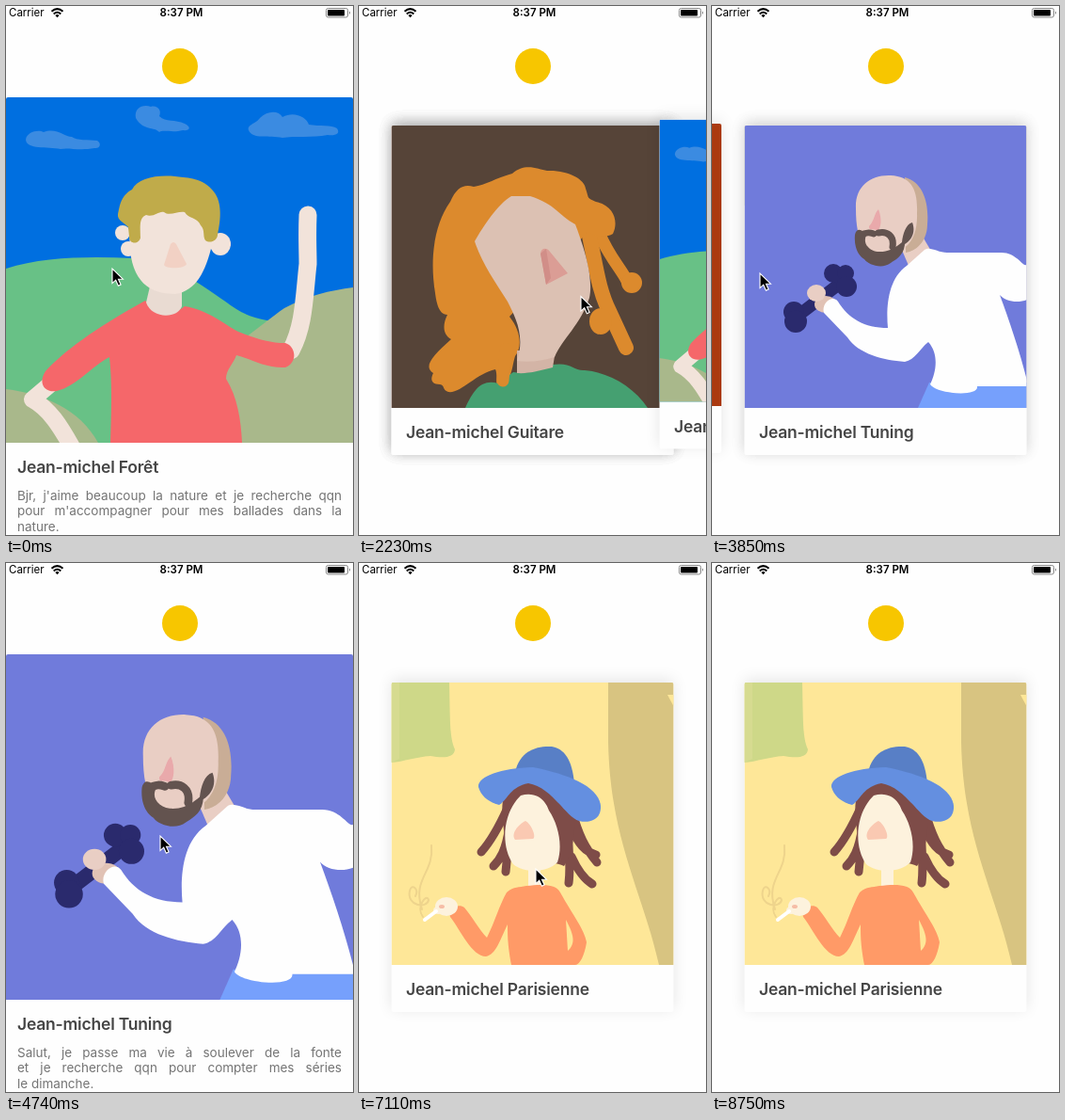
Recreate the animation shown at these times as an HTML page. Size 369 by 562 pixels, loop 9.2 s.

```html
<!DOCTYPE html>
<html lang="fr">
<head>
<meta charset="utf-8">
<title>Cards</title>
<style>
html, body { margin: 0; width: 100%; height: 100%; overflow: hidden; background: #fefefe; }
#stage { position: relative; width: 369px; height: 562px; overflow: hidden; font-family: Inter, "Liberation Sans", sans-serif; }
#bar, #cursor { position: absolute; left: 0; top: 0; overflow: visible; }
.card { position: absolute; left: 0; top: 0; background: #fefefe; border-radius: 2px; overflow: hidden; }
.card svg { display: block; width: 100%; }
.card h1 { position: absolute; margin: 0; font-size: 17.5px; font-weight: 600; line-height: 22px; letter-spacing: -.2px; color: #454545; white-space: nowrap; }
.card div { position: absolute; left: 12px; width: 345px; font-size: 13.5px; line-height: 16.7px; color: #747474; }
.card p { margin: 0; white-space: nowrap; text-align-last: justify; }
.card p:last-child { text-align-last: left; }
.line { fill: none; stroke-linecap: round; stroke-linejoin: round; }
</style>
</head>
<body>
<div id="stage">
  <svg id="bar" width="369" height="97">
    <g font-size="11.5">
      <text x="3" y="11">Carrier</text>
      <text x="186.5" y="11" text-anchor="middle" font-weight="600">8:37 PM</text>
    </g>
    <g class="line" stroke="#000" stroke-width="2" style="stroke-linecap:butt">
      <path d="M48.5 5.8Q54.5 .4 60.5 5.8M50.7 8.4Q54.5 5 58.3 8.4"/>
    </g>
    <path d="M52.4 9.9Q54.5 8.2 56.6 9.9L54.5 12.2Z"/>
    <rect x="340.5" y="2.5" width="23" height="9.5" rx="2" fill="none" stroke="#888"/>
    <rect x="342" y="4" width="18" height="6.5" rx=".8"/>
    <path d="M365 5.5Q367 7.2 365 9Z" fill="#777"/>
    <circle cx="185" cy="64" r="19" fill="#f7c600"/>
  </svg>
  <svg id="cursor" width="14" height="20">
    <path d="M0 0V15.6L3.7 12.2L6.4 18.2L9.1 17L6.5 11.2H11.4Z" stroke="#fff" stroke-width="1.1"/>
  </svg>
</div>
<script>
const CLOSED_BOX = '34.5 127 300 300';
const fill = (color, d) => `<path fill="${color}" d="${d}"/>`;
const line = (color, width, d) => `<path class="line" stroke="${color}" stroke-width="${width}" d="${d}"/>`;
const oval = (color, x, y, rx, ry = rx) => `<ellipse fill="${color}" cx="${x}" cy="${y}" rx="${rx}" ry="${ry}"/>`;

const forest = () => {
  const skin = '#f2e3da', sage = '#a9b88b', cloud = '#3b8be1';
  return fill('#006fe0', 'M0 97H369V464H0Z')
    + fill(cloud, 'M21 142C22 134 34 131 40 134C54 129 62 139 70 139C75 143 88 142 97 143C102 146 100 152 94 151C78 154 66 150 58 152C44 149 22 153 21 142Z')
    + fill(cloud, 'M138 119C136 108 146 104 154 107C161 105 166 111 163 117C170 124 180 120 190 125C198 129 195 133 188 132C177 135 167 131 163 134C158 128 146 133 138 119Z')
    + fill(cloud, 'M258 132C256 126 266 125 270 119C278 111 290 111 294 118C306 111 320 118 322 126C334 128 346 126 352 130C356 136 350 138 342 137C326 140 306 138 294 140C280 137 262 142 258 132Z')
    + fill('#68c186', 'M0 279C40 266 90 266 135 268C180 272 215 302 245 322C262 333 280 334 300 338V464H0Z')
    + fill(sage, 'M215 464L240 362C262 348 280 332 296 321C320 308 345 302 369 299V464Z')
    + fill(sage, 'M0 407C40 412 78 428 98 464H0Z')
    + line(skin, 19, 'M321 222C320 245 321 260 321 274C317 310 317 340 303 366')
    + line(skin, 18, 'M54 396L28 418C46 428 57 445 72 472')
    + fill('#f5676a', 'M148 313C160 326 180 328 190 319C215 323 232 338 247 346C265 353 280 358 297 358C309 362 310 379 297 384C275 385 258 374 245 371C242 380 234 386 234 396C246 415 250 440 251 464H111C112 430 113 400 110 373C92 382 75 404 54 409C40 411 34 400 42 388C60 368 95 342 148 313Z')
    + fill('#e9dbd2', 'M153 298L149 315C155 333 183 332 187 319V298Z')
    + oval(skin, 124, 241, 8) + oval(skin, 130, 258, 8) + oval(skin, 228, 253, 11, 12)
    + fill(skin, 'M132 235C128 288 148 306 180 306C206 302 215 275 222 240V212H140Z')
    + fill('#c0ab4a', 'M131 245C131 254 142 253 143 246C143 235 141 225 149 222C157 225 163 217 168 219C174 224 184 217 190 219C194 226 203 224 207 233C212 238 209 245 212 249C217 253 225 249 225 243C229 225 230 206 219 195C207 181 190 183 180 181C160 179 140 183 134 195C121 202 121 214 119 221C118 228 126 230 130 235Z')
    + fill('#f2d1c4', 'M175 253Q178 249 181 253L192 274C191 279 170 280 168 275Z');
};

const guitar = () => {
  const hair = '#dc8a2d';
  return fill('#564438', 'M34 127H335V427H34Z')
    + line(hair, 13, 'M255 240C264 264 278 278 285 292') + oval(hair, 290, 294, 11)
    + line(hair, 16, 'M243 235C252 275 254 300 266 324L284 363') + oval(hair, 257, 335, 12, 14)
    + fill(hair, 'M163 178C176 166 190 173 200 175C222 174 240 184 241 194C245 206 242 203 252 208C272 212 276 230 270 242C262 247 250 244 243 240L160 330C172 345 174 362 166 372C162 385 164 395 149 408C144 404 148 392 145 386C125 390 108 412 95 410C88 408 92 403 86 402C76 402 76 396 79 390C68 383 78 372 98 354C90 350 88 340 94 328C84 328 82 312 81 305C75 268 80 232 97 208C104 192 112 189 122 192C135 190 145 183 163 178Z')
    + fill('#45a071', 'M113 427C122 408 130 396 148 401L164 389C180 392 195 386 206 381C226 378 228 388 240 387C265 389 292 404 307 427Z')
    + fill('#d3b4a6', 'M168 366H209L206 384C194 387 180 391 168 390Z')
    + fill('#dcc1b3', 'M162 202H182C208 210 212 222 230 232C242 263 249 292 245 310C236 338 216 354 208 373C195 377 180 379 168 377C177 350 166 330 158 314C144 292 130 272 123 250C132 234 148 210 162 202Z')
    + line(hair, 13, 'M156 364L153 398')
    + fill('#db9d95', 'M193 263C194 256 200 257 203 261L222 284L199 296Z')
    + fill('#d18e88', 'M193 263L199 258L204 289L199 296Z');
};

const cook = () => fill('#ab3a10', 'M34 127H335V427H34Z')
  + fill('#f0d8a8', 'M105 427C108 365 145 345 185 345C225 345 260 365 265 427Z')
  + oval('#e6c4b0', 185, 270, 46, 62)
  + fill('#4a2c24', 'M136 262C136 190 234 190 234 262C215 230 155 230 136 262Z');

const tuning = () => {
  const skin = '#e9cec4', beard = '#63534f', steel = '#2a2a6d', bg = '#707bdb';
  return fill(bg, 'M34 127H335V427H34Z')
    + fill('#76a0fc', 'M231 400L219 427H335V400Z')
    + fill(skin, 'M198 250L224 245L234 262L210 278Z')
    + fill('#c9ad96', 'M205 182C224 187 231 208 229 232C229 248 219 260 206 262Z')
    + fill(skin, 'M153 215C152 192 168 179 190 180C212 181 219 195 218 220C219 246 208 264 180 264C158 262 153 242 153 215Z')
    + fill('#e9a9ab', 'M177 216C181 226 180 236 176 239C171 235 167 240 167 234C173 228 172 221 177 216Z')
    + fill(beard, 'M152 243C154 234 161 238 164 244C160 252 167 260 176 261C188 262 196 256 202 251C203 242 206 232 213 230C217 240 212 249 205 253C204 266 194 270 190 273C181 280 166 275 162 269C154 264 151 254 152 243Z')
    + line(beard, 7, 'M157 244C165 239 169 241 172 242M177 241C186 239 194 244 192 256')
    + line(steel, 13, 'M90 330L137 294')
    + oval(steel, 87, 325, 11) + oval(steel, 89, 335, 12) + oval(steel, 129, 284, 10) + oval(steel, 142, 284, 9) + oval(steel, 143, 298, 11)
    + oval('#e1c2b5', 121, 317, 12, 9) + oval(skin, 111, 305, 10, 9)
    + fill('#fefefe', 'M226 259C232 255 240 262 250 262L308 262C325 262 332 280 335 274V404H282C284 416 238 412 232 402C238 390 242 370 230 357C220 365 216 376 205 378C182 376 156 370 144 352L119 326C116 316 128 306 134 314C145 332 162 342 187 342C185 320 187 290 207 276Z')
    + fill(bg, 'M306 307C312 314 325 316 335 312V398C327 366 316 334 306 307Z');
};

const paris = () => {
  const hair = '#7e4c48', pale = '#fdf2dd', wall = '#fee798';
  return fill(wall, 'M34 127H335V427H34Z')
    + fill('#ced888', 'M34 127H96C97 165 96 185 102 198C101 208 88 207 76 205C60 206 48 211 34 212Z')
    + fill('#d6db90', 'M34 127H43V208L34 212Z')
    + fill('#d8c481', 'M265 127H335V427H319C302 350 267 295 265 190Z')
    + fill(wall, 'M328 140H335V153Z')
    + line('#eed48c', 2, 'M68 376C60 366 72 350 74 358C72 368 50 364 54 348C56 340 64 346 60 354M67 368C56 335 80 330 77 300')
    + line(hair, 9, 'M158 260C148 282 140 296 130 307M160 280C156 306 150 315 143 322M158 308L156 328M223 268C221 300 226 318 223 340M226 262C234 290 240 302 253 318M228 284Q235 305 252 310M226 312Q236 334 248 341')
    + fill(hair, 'M153 275C150 245 156 232 180 232C206 230 226 246 229 272C230 285 227 310 218 322C205 315 160 315 156 302Z')
    + fill(pale, 'M180 316H193V343H180Z')
    + fill(pale, 'M172 247C186 243 197 249 202 263C212 278 217 300 211 318C200 329 176 330 164 320C150 300 153 265 172 247Z')
    + fill('#fac9b2', 'M177 274C183 277 189 291 185 293L166 294C161 288 169 278 177 274Z')
    + fill('#587fc6', 'M166 222C171 200 188 194 205 195C222 198 227 215 229 234L190 230Z')
    + fill('#648fe0', 'M127 238C126 227 150 218 185 217C215 223 255 235 257 258C258 272 246 277 234 274C220 270 205 238 180 234C160 238 158 252 149 257C138 254 130 248 127 238Z')
    + fill('#ff9a67', 'M178 343C195 341 210 341 214 350C228 375 240 390 242 403C240 416 235 427 230 427H162C158 405 158 395 158 384C150 400 146 416 135 418C120 418 108 390 97 376C94 367 106 361 112 366C120 375 128 390 136 398C145 380 149 364 157 350C165 343 170 345 178 343Z')
    + fill(wall, 'M220 379C228 394 231 404 222 412Z')
    + oval(pale, 93, 365, 12, 10) + oval(pale, 84, 369, 5, 4) + oval('#f6bda6', 88, 365, 3, 2)
    + line('#fff', 4, 'M70 379L82 370');
};

const REST = [[0, 0, 0]];
const cards = [
  { name: 'Parisienne', art: paris(), move: [[43, 0, 0], [46, 34, -30], [48, 0, 0]] },
  { name: 'Tuning', art: tuning(), move: [[37, 0, 0], [38, 90, -5], [39, 270, -12], [40, 420, -15]],
    open: [[25, 0], [26, .6], [27, 1], [34, 1], [37, 0]],
    about: ["Salut, je passe ma vie à soulever de la fonte", "et je recherche qqn pour compter mes séries", "le dimanche."] },
  { name: 'Cuisine', art: cook(), move: [[19, 0, 0], [20, -90, -5], [21, -324.5, -2], [22, -400, 0]] },
  { name: 'Guitare', art: guitar(), move: [[16, 0, 0], [17, -116, -8], [18, -400, -15]] },
  { name: 'Forêt', art: forest(), box: '0 97 369 367', move: [[7, 0, 0], [8, 38, -3], [9, 150, -6], [11, 420, -7]],
    open: [[0, 1], [3, 0]],
    about: ["Bjr, j'aime beaucoup la nature et je recherche qqn", "pour m'accompagner pour mes ballades dans la", "nature."] },
];
const pointer = [[0, 113, 279], [3, 113, 279], [7, 92, 317], [8, 130, 314], [9, 210, 311], [11, 262, 306], [13, 262, 306],
  [16, 246, 295], [17, 130, 287], [18, 180, 284], [19, 235, 286], [20, 150, 285], [21, 51, 284], [24, 164, 290], [32, 164, 290],
  [35, 110, 281], [37, 110, 281], [38, 200, 276], [39, 240, 270], [41, 240, 270], [43, 188, 325], [46, 222, 295], [48, 188, 325],
  [49, 188, 325], [52, 348, 536]];

const stage = document.getElementById('stage');
const cursor = document.getElementById('cursor');
for (const card of cards) {
  const el = card.el = document.createElement('section');
  el.className = 'card';
  el.innerHTML = `<svg viewBox="${card.box || CLOSED_BOX}" preserveAspectRatio="xMidYMid slice">${card.art}</svg>`
    + `<h1>Jean-michel ${card.name}</h1><div>${(card.about || []).map(s => `<p>${s}</p>`).join('')}</div>`;
  [card.picture, card.title, card.text] = el.children;
  stage.insertBefore(el, cursor);
}

const mix = (a, b, p) => a + (b - a) * p;

function sample(keys, step) {
  const next = keys.findIndex(key => key[0] > step);
  if (next < 0) return keys[keys.length - 1].slice(1);
  if (next === 0) return keys[0].slice(1);
  const a = keys[next - 1], b = keys[next];
  const p = (step - a[0]) / (b[0] - a[0]);
  return a.slice(1).map((v, i) => mix(v, b[i + 1], p));
}

function poseCard(card, step) {
  const [x, y] = sample(card.move || REST, step);
  const [p] = sample(card.open || [[0, 0]], step);
  const height = mix(300, 367, p);
  Object.assign(card.el.style, {
    transform: `translate(${mix(34.5, 0, p) + x}px, ${mix(127, 97, p) + y}px)`,
    width: mix(300, 369, p) + 'px',
    height: height + mix(50, 98, p) + 'px',
    boxShadow: `0 -3px 16px rgba(0, 0, 0, ${.1 * (1 - p)})`,
  });
  card.picture.style.height = height + 'px';
  card.title.style.left = mix(15.5, 12, p) + 'px';
  card.title.style.top = height + 15 + 'px';
  card.text.style.top = height + 47.5 + 'px';
  card.text.style.opacity = p;
}

const LOOP = 9200, FIRST = 740, STEP = 148;
const start = performance.now();

function draw() {
  const t = (performance.now() - start) % LOOP;
  const step = Math.floor((t - FIRST) / STEP);
  cards.forEach(card => poseCard(card, step));
  const [x, y] = sample(pointer, step);
  cursor.style.transform = `translate(${x}px, ${y}px)`;
  cursor.style.visibility = step < 54 ? 'visible' : 'hidden';
  requestAnimationFrame(draw);
}
draw();
</script>
</body>
</html>
```
